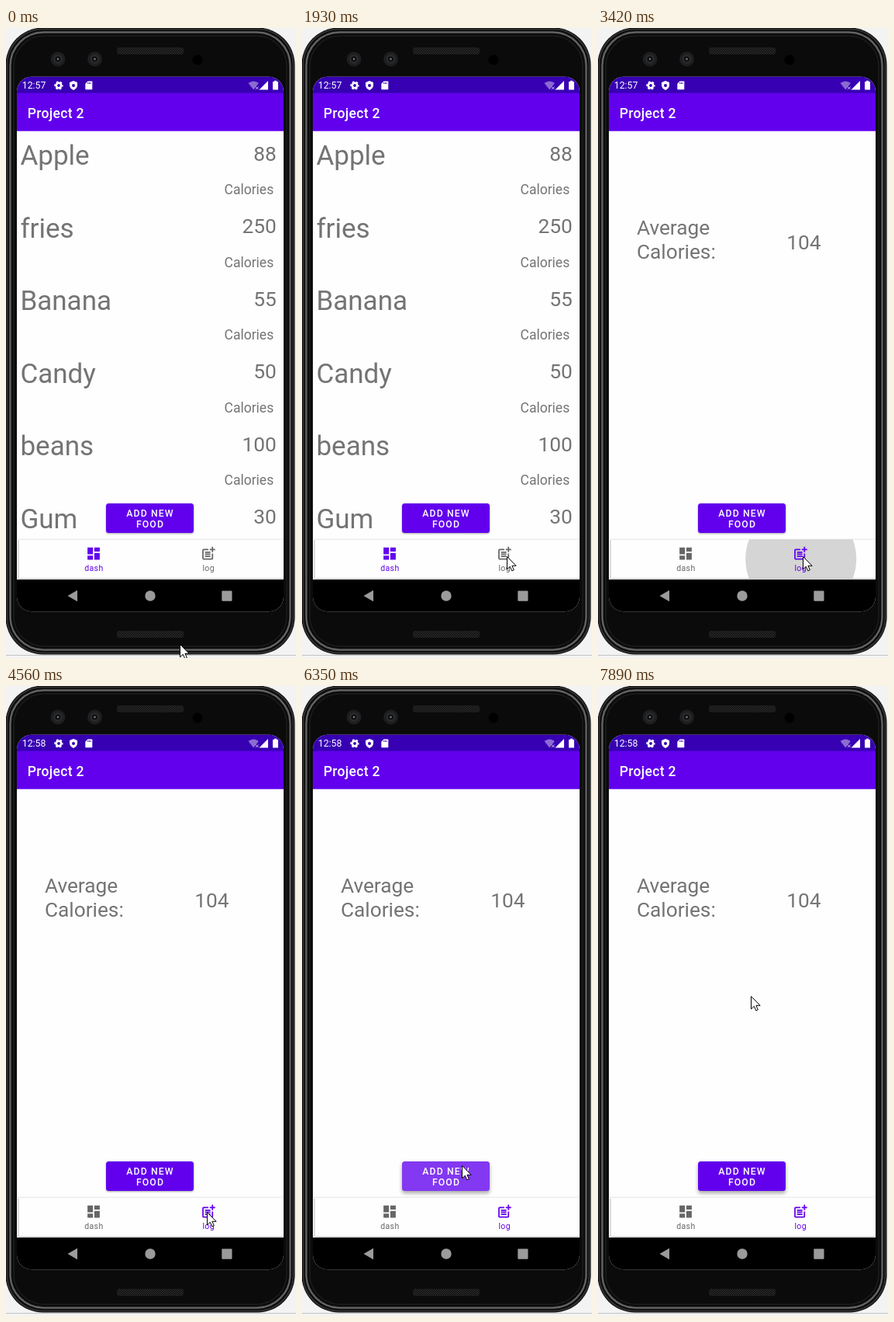
These frames come from a looping animation (374 px wide and 811 px high, 8000 ms). An HTML page:

```html
<!DOCTYPE html>
<html lang="en">
<head>
<meta charset="utf-8">
<title>Calorie tracker</title>
<style>
  html, body { margin: 0; width: 100%; height: 100%; overflow: hidden; background: #f3f3f3; }
  svg { display: block; width: 374px; height: 811px; font-family: Roboto, sans-serif; }
  .name { font-size: 35.04px; }
  .num { font-size: 26.28px; }
  .unit { font-size: 17.52px; }
  .title { font-size: 17.52px; font-weight: 500; letter-spacing: .0175em; }
  .clock { font-size: 12.26px; }
  .cta { font-size: 12.26px; font-weight: 500; letter-spacing: .089em; }
  .tab { font-size: 10.5px; letter-spacing: .0333em; }
  .end { text-anchor: end; }
  .mid { text-anchor: middle; }
</style>
</head>
<body>
<svg viewBox="0 0 374 811">
  <defs>
    <pattern id="mesh" width="3" height="3" patternUnits="userSpaceOnUse">
      <rect width="3" height="3" fill="#0f0f0f"/>
      <circle cx="1" cy="1" r=".7" fill="#454545"/><circle cx="2.5" cy="2.5" r=".7" fill="#333"/>
    </pattern>
    <clipPath id="screen"><rect x="14" y="62.7" width="344" height="688.5" rx="19"/></clipPath>
    <clipPath id="bar"><rect x="16.5" y="658.5" width="341.5" height="50"/></clipPath>
    <filter id="edge"><feGaussianBlur stdDeviation=".6"/></filter>
    <filter id="blur" x="-20%" y="-40%" width="140%" height="180%"><feGaussianBlur stdDeviation="1.3"/></filter>
    <filter id="soft" x="-20%" y="-40%" width="140%" height="180%"><feGaussianBlur stdDeviation="2.4"/></filter>
    <g id="lens">
      <circle r="9.5" fill="#1d1e20"/><circle r="6" fill="#292b2e"/>
      <circle r="3.6" fill="#111"/><circle r="1.3" fill="#777"/>
    </g>
  </defs>

  <!-- phone body -->
  <path d="M0 807.5H374" stroke="#c4c4c4"/>
  <rect x="-.5" y="-.5" width="373" height="807" rx="48" fill="#0b0b0b"/>
  <g fill="none" filter="url(#edge)">
    <rect x="1.5" y="1.5" width="369" height="803" rx="46" stroke="#303030" stroke-width="2"/>
    <rect x="5.5" y="5.5" width="361" height="795" rx="43" stroke="#626262" stroke-width="2.4"/>
    <rect x="10" y="10" width="352" height="786" rx="39" stroke="#1c1c1c" stroke-width="1.5"/>
  </g>
  <rect x="143" y="25" width="86" height="9" rx="3" fill="url(#mesh)"/>
  <rect x="143" y="776" width="86" height="9" rx="3" fill="url(#mesh)"/>
  <use href="#lens" x="67" y="40"/><use href="#lens" x="114.5" y="40"/>
  <circle cx="247" cy="41" r="6.5" fill="#000"/>

  <g clip-path="url(#screen)">
    <rect x="14" y="62" width="344" height="690" fill="#fefefe"/>
    <rect x="14" y="62" width="344" height="22" fill="#3700b3"/>
    <rect x="14" y="83.7" width="344" height="49" fill="#6200ee"/>

    <!-- status bar -->
    <g fill="#fff">
      <text class="clock" id="clock" x="20.8" y="78.2"></text>
      <g fill="none" stroke="#fff" transform="translate(68 74)">
        <circle r="3.2" stroke-width="2.6"/>
        <circle r="4.8" stroke-width="1.8" stroke-dasharray="2.6 2.427" stroke-dashoffset="1.3"/>
      </g>
      <path d="M87 68l5 2v3.6c0 3-2 5.3-5 6.4c-3-1.1-5-3.4-5-6.4V70z"/>
      <circle cx="87" cy="74" r="2" fill="#3700b3"/>
      <path d="M105.5 68.5h5q.8 0 .8.8v9.2q0 .8-.8.8h-7.4q-.8 0-.8-.8v-6.7z"/>
      <path d="M105.7 70v2M107.4 70v2M109.1 70v2" stroke="#3700b3" stroke-width=".9"/>
      <path d="M312.5 71q6.7-5 13.4 0l-6.7 8.6z" opacity=".42"/>
      <path d="M322 75.5l3.6 3.6m0-3.6l-3.6 3.6" stroke="#fff" opacity=".75"/>
      <path d="M338 68v11.5h-11.5z"/>
      <path d="M346 67.7h3v1.3h2v10.5h-7V69h2z"/>
    </g>
    <text class="title" x="27.8" y="115.7" fill="#fff">Project 2</text>

    <g id="list" fill="#747474"></g>
    <g id="log" class="num" fill="#747474">
      <text x="49.9" y="266.2">Average</text>
      <text x="49.9" y="297">Calories:</text>
      <text x="243.2" y="284.7">104</text>
    </g>

    <!-- button -->
    <rect id="shade" x="129" width="113" height="38" rx="3"/>
    <rect id="button" x="129" y="612" width="113" height="38" rx="3.5"/>
    <g class="cta mid" fill="#fff">
      <text x="186" y="628.6">ADD NEW</text>
      <text x="186" y="643">FOOD</text>
    </g>

    <!-- tabs -->
    <rect x="16" y="659" width="346" height="50" fill="#000" opacity=".4" filter="url(#blur)"/>
    <rect x="16.5" y="658.5" width="341.5" height="50" fill="#fefefe"/>
    <circle id="ripple" cx="261.7" cy="683.5" clip-path="url(#bar)"/>
    <g id="dashTab">
      <path transform="translate(102.5 666) scale(.876)" d="M3 13h8V3H3zm0 8h8v-6H3zm10 0h8V11h-8zm0-18v6h8V3z"/>
      <text class="tab mid" x="113.4" y="699">dash</text>
    </g>
    <g id="logTab">
      <path transform="translate(250.5 666) scale(.876)" d="M17 19H5V7h7V5H5q-2 0-2 2v12q0 2 2 2h12q2 0 2-2v-7h-2zM19 2h-2v3h-3v2h3v3h2V7h3V5h-3zM7 9h8v2H7zM7 12h8v2H7zM7 15h8v2H7z"/>
      <text class="tab mid" x="261.2" y="699">log</text>
    </g>

    <!-- system navigation -->
    <rect x="14" y="710" width="344" height="42" fill="#000"/>
    <g fill="#9b9b9b">
      <path d="M79.5 731l12.5-7.3v14.6z"/>
      <circle cx="186" cy="731" r="6.7"/>
      <rect x="278.3" y="724.6" width="13.2" height="13.2" rx="1"/>
    </g>
  </g>

  <path id="cursor" d="M0 0V16.3L3.8 12.8L6.3 18.3L8.8 17.2L6.4 11.8H11.6Z" fill="#fff" stroke="#000"/>
</svg>

<script>
const LOOP = 8000;
const PURPLE = '#6200ee', GREY = '#666';
const $ = id => document.getElementById(id);
const set = (id, attrs) => {
  for (const key in attrs) $(id).setAttribute(key, attrs[key]);
};

const foods = [['Apple', 88], ['fries', 250], ['Banana', 55], ['Candy', 50], ['beans', 100], ['Gum', 30]];
$('list').innerHTML = foods.map(([name, calories], i) => {
  const y = 93.5 * i;
  return `<text class="name" x="18.4" y="${176 + y}">${name}</text>
    <text class="num end" x="348.7" y="${170.5 + y}">${calories}</text>
    <text class="unit end" x="345.2" y="${214 + y}">Calories</text>`;
}).join('');

const pointer = [
  [0, 224, 793], [930, 224, 792], [1080, 228, 772], [1200, 242, 725], [1320, 255, 689],
  [1780, 262, 681], [1930, 264, 680], [4560, 259, 677], [4710, 246, 662], [4860, 222, 629],
  [5010, 209, 619], [5130, 206, 617], [7620, 206, 559], [7770, 200, 460], [7890, 197, 399]
];
// [time, radius, opacity]
const ripples = [[0, 0, 0], [2490, 63, .16], [3420, 71.5, .16], [3570, 71.5, .07], [3690, 0, 0]];
const at = (steps, t) => steps.findLast(step => step[0] <= t);

function draw(now) {
  const t = now % LOOP;
  const onLog = t >= 3420;
  const raised = t >= 6350;
  const pressed = raised && t < 6500;

  $('clock').textContent = t < 3570 ? '12:57' : '12:58';
  set('list', { display: onLog ? 'none' : 'inline' });
  set('log', { display: onLog ? 'inline' : 'none' });
  set('dashTab', { fill: onLog ? GREY : PURPLE });
  set('logTab', { fill: onLog ? PURPLE : GREY });
  set('button', { fill: pressed ? '#8338f1' : PURPLE });
  set('shade', raised
    ? { y: 615, opacity: .34, filter: 'url(#soft)' }
    : { y: 613, opacity: .34, filter: 'url(#blur)' });

  const [, r, opacity] = at(ripples, t);
  set('ripple', { r, opacity });
  const [, x, y] = at(pointer, t);
  set('cursor', { transform: `translate(${x + .5} ${y + .5})` });
}

const start = performance.now();
function tick() {
  draw(performance.now() - start);
  requestAnimationFrame(tick);
}
tick();
</script>
</body>
</html>
```
